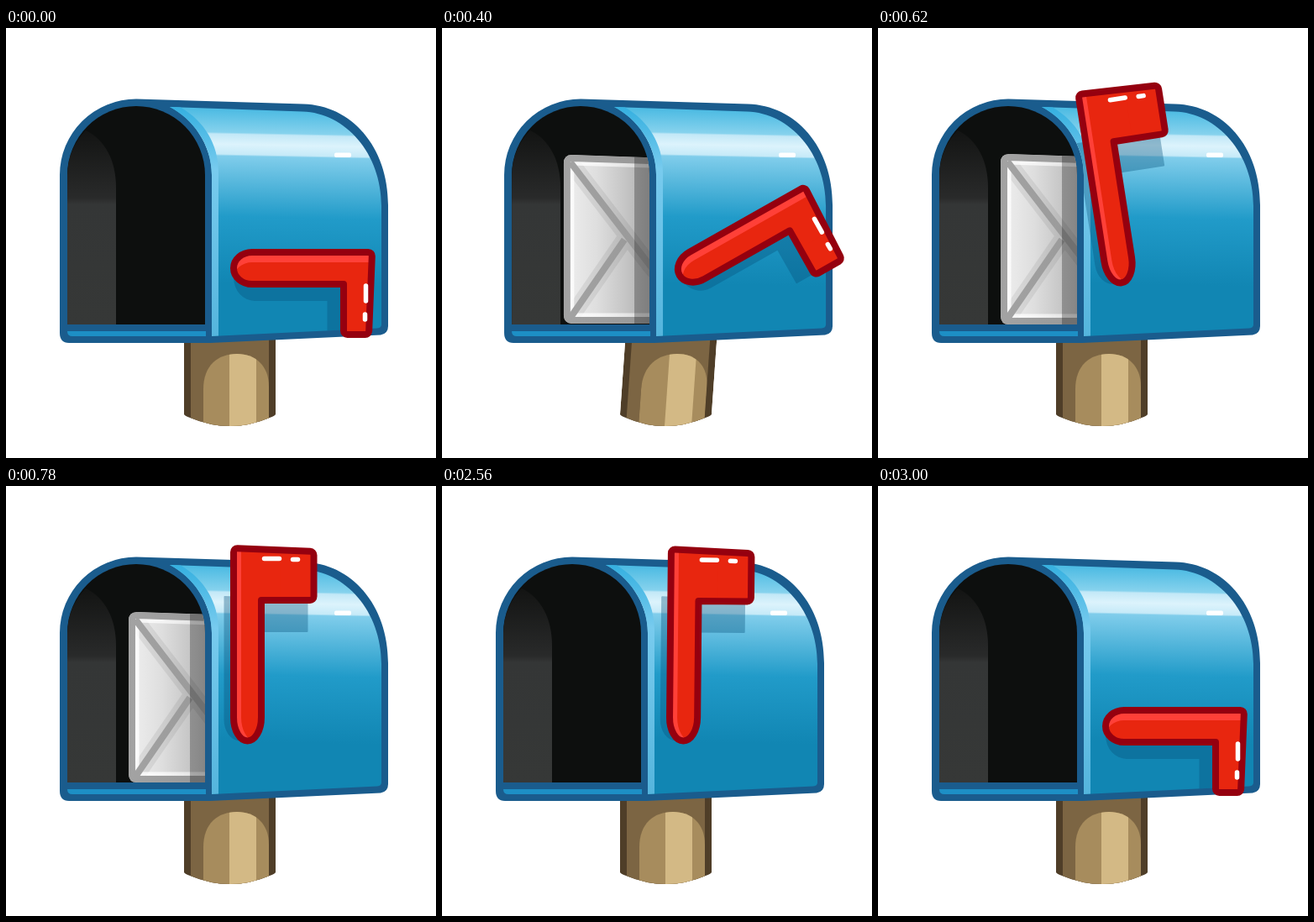
Recreate the animation shown at these times as an HTML page with a canvas. Size 512 by 512 pixels, loop 3600 ms.

```html
<!DOCTYPE html>
<html lang="en">
<head>
<meta charset="utf-8">
<title>Mailbox</title>
<style>
html, body { margin: 0; width: 100%; height: 100%; overflow: hidden; background: #fff; }
canvas { display: block; width: 512px; height: 512px; }
</style>
</head>
<body>
<canvas id="stage" width="512" height="512"></canvas>
<script>
const ctx = document.getElementById('stage').getContext('2d');
const LOOP = 3600, STEP = 20;
const EDGE = '#1a5c8d';

// Timing helpers
const progress = (t, from, to) => Math.min(1, Math.max(0, (t - from) / (to - from)));
const ease = (t, from, to) => (1 - Math.cos(Math.PI * progress(t, from, to))) / 2;
const backOut = (t, from, to) => {
  const w = progress(t, from, to) - 1;
  return 1 + w * w * (2.7 * w + 1.7);
};

// Pose at time t
const flagAngle = t => 90 * (1 - backOut(t, 368, 780) + ease(t, 2537, 3000));
const boxShift = t => 12.3 * Math.sin(Math.PI * progress(t, 330, 560));
const letterX = t => -232 + 386 * ease(t, 40, 460) - 8 * ease(t, 460, 580) + 104 * ease(t, 2320, 2540);
const letterScale = t => .8 + .2 * ease(t, 40, 460);

function gradient(x0, y0, x1, y1, stops) {
  const g = ctx.createLinearGradient(x0, y0, x1, y1);
  const len = Math.hypot(x1 - x0, y1 - y0);
  stops.forEach(([p, color]) => g.addColorStop(Math.min(1, p / len), color));
  return g;
}

function fill(path, color) {
  ctx.fillStyle = color;
  ctx.fill(path);
}

function stroke(path, color, width) {
  ctx.strokeStyle = color;
  ctx.lineWidth = width;
  ctx.stroke(path);
}

function layer(draw, clip) {
  ctx.save();
  if (clip) ctx.clip(clip);
  draw();
  ctx.restore();
}

const post = new Path2D('M212 340H321V460Q320 462 314 464Q267 484 219 464Q213 462 212 460Z');
const postLight = new Path2D('M235 480V430C235 402 252 388 275 388C297 388 313 402 313 427V480Z');

function drawPost(shift) {
  const band = (x0, x1, color) => {
    ctx.fillStyle = color;
    ctx.fillRect(x0, 330, x1 - x0, 150);
  };
  ctx.save();
  ctx.transform(1, 0, -shift / 144, 1, shift * 460 / 144, 0);
  layer(() => {
    band(212, 321, '#4f3e28');
    band(220, 313, '#7c6543');
    layer(() => {
      band(235, 313, '#a78c5d');
      band(266, 298, '#d3b985');
    }, postLight);
  }, post);
  ctx.restore();
}

const shell = new Path2D('M64 175A91 90.5 0 0 1 155 84.5L354 90.5C411 92 455 141 455 211V355Q455 364 446 365.5L243 375H75Q64 375 64 363Z');
const side = new Path2D('M195 94L353 99.5C404 101 447 149 447 212V353Q447 357 442 357.5L245 367V175C245 138 222 108 195 94Z');
const rim = new Path2D('M195 94C222 108 245 138 245 175V367L253 366.5V172C253 138 236 111 208 94.5Z');
const opening = new Path2D('M73 353V175A82 82 0 0 1 237 175V353Z');
const wall = new Path2D('M73 353V175C73 154 82 135 95 122C118 133 131 158 131 190V353Z');
const sill = new Path2D('M73 361H238V367H79Q73 367 73 361Z');
const slot = new Path2D('M-400 0H155V93A82 82 0 0 1 237 175V353H-400Z');

const sideColor = gradient(300, 95, 294.6, 365, [[0, '#48b9e2'], [30, '#86d2ed'], [32, '#c2e8f7'],
  [44, '#dcf3fc'], [56, '#c6eaf8'], [58, '#80cdeb'], [130, '#219bc9'], [210, '#1186b3']]);
const rimColor = gradient(0, 94, 0, 366, [[0, '#35b0e0'], [75, '#78cbee'], [272, '#55b5dd']]);
const wallColor = gradient(0, 118, 0, 353, [[0, '#121312'], [84, '#292a2a'], [92, '#343636'], [235, '#363837']]);

function drawBox() {
  fill(shell, EDGE);
  fill(side, sideColor);
  fill(rim, rimColor);
  fill(opening, '#0d0f0e');
  layer(() => fill(wall, wallColor), opening);
  fill(sill, '#1d8fc5');
  ctx.fillStyle = '#fff';
  ctx.beginPath();
  ctx.roundRect(391, 148.5, 20, 5.5, 2);
  ctx.fill();
}

// Letter, measured from its left edge and vertical middle
const letter = new Path2D('M0 -92Q0 -102 10 -102L218 -95Q228 -95 228 -85V92Q228 101 218 101H10Q0 101 0 91Z');
const letterInner = new Path2D('M10 -92L218 -85V91H10Z');
const letterFolds = new Path2D('M8 94L73 0M220 94L157 0M8 -93L106 34Q114 44 122 34L220 -87');
const letterMarks = new Path2D('M164 -82H181M186 -82H193');
const paper = gradient(0, 0, 228, 0, [[0, '#f0f0f0'], [40, '#dedede'], [73, '#c6c6c6'], [118, '#a1a1a1'], [160, '#7f7f7f'], [228, '#868686']]);
const crease = gradient(0, 0, 228, 0, [[0, '#a3a3a3'], [90, '#999999'], [175, '#6c6c6c'], [228, '#777777']]);
const shine = gradient(0, 0, 228, 0, [[0, 'rgba(255,255,255,.85)'], [110, 'rgba(255,255,255,.4)'], [228, 'rgba(255,255,255,.08)']]);

function drawLetter(x, scale) {
  layer(() => {
    ctx.translate(x, 252);
    ctx.scale(scale, scale);
    ctx.clip(letter);
    fill(letter, paper);
    stroke(letterFolds, 'rgba(0,0,0,.07)', 20);
    stroke(letterInner, shine, 5);
    stroke(letterMarks, 'rgba(255,255,255,.15)', 5);
    stroke(letterFolds, crease, 8);
    stroke(letter, crease, 16);
    // Shade cast by the door frame, fixed to the box
    ctx.fillStyle = 'rgba(0,0,0,.27)';
    ctx.fillRect((219 - x) / scale, -110, 30 / scale, 220);
  }, slot);
}

// Flag seen upright: a shaft with a rounded foot and a head reaching right
function flagPath({ mid, half, len, reach, drop, foot }, r) {
  const p = new Path2D();
  const base = 16.5 - foot;
  p.moveTo(mid - half, base);
  p.arcTo(mid - half, -len, reach, 4 - len, r);
  p.arcTo(reach, 4 - len, reach, drop - len, r);
  p.arcTo(reach, drop - len, mid + half, drop - len, r);
  p.lineTo(mid + half, drop - len);
  p.lineTo(mid + half, base);
  p.ellipse(mid, base, half, foot, 0, 0, Math.PI);
  p.closePath();
  return p;
}

function drawFlag(angle) {
  // The flag looks shorter the further it leans
  const fold = Math.pow(Math.max(angle, 0) / 90, .75);
  const mix = (up, down) => up + (down - up) * fold;
  const place = () => {
    ctx.translate(287.5, 287);
    ctx.rotate(angle * Math.PI / 180);
  };
  const len = mix(213, 148.5);
  const body = flagPath({ mid: -fold, half: mix(16.5, 19), len, reach: mix(79, 78), drop: mix(62, 34), foot: mix(28, 22) }, 4.5);
  const shade = flagPath({ mid: mix(-9, 10), half: mix(19, 28), len: mix(156, 140), reach: mix(72, 78), drop: mix(43, 45), foot: 25 }, 1);

  layer(() => {
    place();
    fill(shade, 'rgba(8,82,122,.36)');
  }, side);

  layer(() => {
    place();
    fill(body, '#ff4038');
    layer(() => {
      ctx.translate(mix(9, 12), 0);
      fill(body, '#e8260f');
      ctx.fillRect(30, -240, 80, 140);
    }, body);
    ctx.lineJoin = ctx.lineCap = 'round';
    stroke(body, '#95000f', 8);
    const y = mix(12.5, 7.5) - len;
    stroke(new Path2D(`M20 ${y}H38M54 ${y + 1}H60`), '#fff', 5.5);
  });
}

function draw(t) {
  const shift = boxShift(t);
  ctx.fillStyle = '#fff';
  ctx.fillRect(0, 0, 512, 512);
  drawPost(shift);
  ctx.save();
  ctx.translate(shift, 0);
  drawBox();
  drawLetter(letterX(t), letterScale(t));
  drawFlag(flagAngle(t));
  ctx.restore();
}

const start = performance.now();
function tick() {
  const t = (performance.now() - start) % LOOP;
  draw(Math.floor(t / STEP) * STEP);
  requestAnimationFrame(tick);
}
tick();
</script>
</body>
</html>
```
